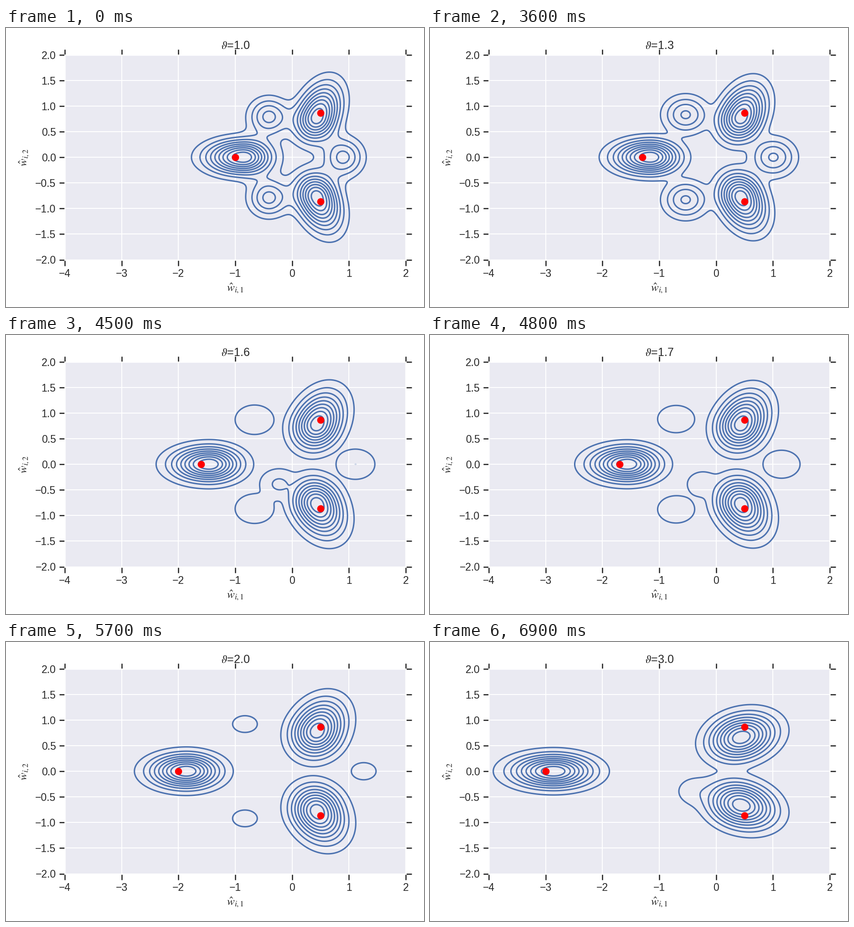
Animation, 917 px wide and 611 px high, one loop 9900 ms. Source, as a matplotlib script:

```python
import numpy as np
import matplotlib.pyplot as plt
from matplotlib.animation import FuncAnimation

W, H, DPI = 917, 611, 100
INK = "#262626"
plt.rcParams.update({
    "font.family": "Liberation Sans",
    "mathtext.fontset": "stix",
    "text.color": INK,
})

THETAS = np.r_[np.linspace(1, 2, 11), np.linspace(2.25, 3, 4)]
X, Y = np.meshgrid(np.linspace(-4, 2, 361), np.linspace(-2, 2, 241))


def blob(peak, x, y, angle, outward, inward, across, tail=0):
    """Bell with a skewed main axis and a share of wider tail."""
    c, s = np.cos(np.radians(angle)), np.sin(np.radians(angle))
    dx, dy = X - x, Y - y
    u, v = dx * c + dy * s, dy * c - dx * s
    q = (u / np.where(u > 0, outward, inward)) ** 2 + (v / across) ** 2
    return peak * ((1 - tail) * np.exp(-q / 2) + tail * np.exp(-q / 8))


def round_bump(peak, x, y, sx, sy):
    return blob(peak, x, y, 0, sx, sx, sy)


def density(theta):
    def mix(*values):
        """Pass through the values at theta = 1, 2 and 3."""
        return np.interp(theta, (1, 2, 3), values)

    grown = theta - 1
    tail = np.interp(theta, (1.3, 1.6), (0, .05))
    parts = [blob(9.95, .14 - theta, 0, 180, mix(.425, .405, .47),
                  mix(.32, .365, .435), mix(.218, .21, .205), tail)]

    # Upper and lower halves mirror each other
    bump_peak = np.interp(theta, (1, 1.3, 1.6, 2, 2.5), (4.4, 4.2, 2, 1.25, 0))
    bump_width = mix(.235, .325, .325)
    for side in (1, -1):
        parts.append(blob(9.8, .44, side * mix(.78, .78, .66),
                          side * mix(70, 63, 19), mix(.43, .39, .385),
                          mix(.305, .315, .365), mix(.235, .275, .27), tail))
        parts.append(round_bump(bump_peak, -.41 - .42 * grown,
                                side * (.79 + .13 * grown), bump_width, .244))
    parts.append(round_bump(bump_peak, .9 + .36 * grown, 0, bump_width, .25))

    shoulder = np.interp(theta, (1.3, 1.6, 2, 3), (0, 2.2, 0, 1.5))
    parts.append(round_bump(shoulder, mix(-.2, -.25, -.4), -.39, .27, .24))

    # A higher power keeps neighbours from flowing together
    power = np.interp(theta, (1.2, 1.6, 2, 3), (1, 3, 3, 1.8))
    return sum(part ** power for part in parts) ** (1 / power)


def label(x, y, text, **kw):
    return fig.text(x / W, 1 - y / H, text, fontsize=18, ha="center",
                    va="baseline", **kw)


fig = plt.figure(figsize=(W / DPI, H / DPI), dpi=DPI, facecolor="white")
ax = fig.add_axes([129 / W, 1 - 507.5 / H, 748 / W, 449 / H],
                  facecolor="#EAEAF2")
ax.set(xlim=(-4, 2), ylim=(-2, 2),
       xticks=np.arange(-4, 3), yticks=np.arange(-2, 2.1, .5))
ax.set_axisbelow(True)
ax.grid(color="white", linewidth=1.5)
ax.tick_params(top=True, right=True, length=9, width=1.875, pad=5,
               color=INK, labelcolor=INK, labelsize=16.5)
for spine in ax.spines.values():
    spine.set(color="white", linewidth=1.875)

title = label(503, 46, "")
label(503, 576, r"$\hat{w}_{i,1}$")
label(46, 283, r"$\hat{w}_{i,2}$", rotation=90, rotation_mode="anchor")
dots, = ax.plot([], [], "o", color="red", markersize=10.3, zorder=5)
contours = None


def update(frame):
    global contours
    theta = THETAS[np.clip(frame - 9, 0, len(THETAS) - 1)]
    if contours is not None:
        contours.remove()
    contours = ax.contour(X, Y, density(theta), levels=range(1, 10),
                          colors="#4C72B0", linewidths=2.25, zorder=3)
    dots.set_data([-theta, .5, .5], [0, np.sqrt(.75), -np.sqrt(.75)])
    title.set_text(rf"$\vartheta$={theta:.1f}")
    return title, dots


anim = FuncAnimation(fig, update, frames=33, interval=300, init_func=lambda: [],
                     repeat=True, repeat_delay=0, blit=False)
plt.show()
```
